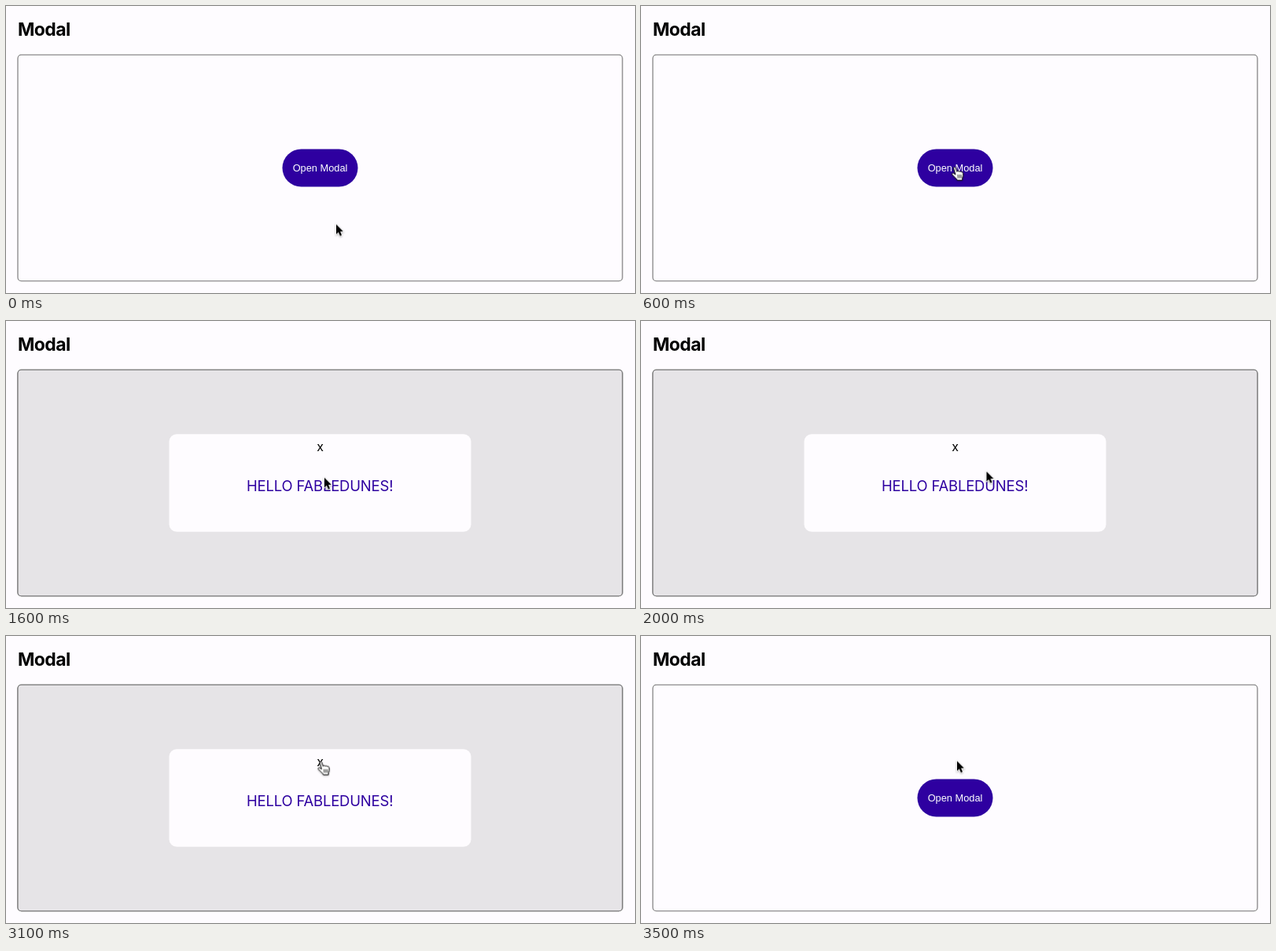
Recreate the animation shown at these times as an HTML page. Size 800 px wide and 366 px high, loop 5.5 s.

```html
<!DOCTYPE html>
<html lang="en">
<head>
<meta charset="utf-8">
<title>Modal</title>
<style>
  html, body { margin: 0; width: 100%; height: 100%; overflow: hidden; background: #fefcff; }
  svg { display: block; width: 800px; height: 366px; }
  text { font-family: Inter, "Open Sans", sans-serif; }

  .title { font-size: 23px; font-weight: 700; letter-spacing: -.6px; }
  .label { font: 12.8px "Liberation Sans", Arial, sans-serif; fill: #fff; text-anchor: middle; }
  .close { font-size: 16px; text-anchor: middle; }
  .hello { font-size: 18.5px; letter-spacing: -.2px; fill: #2e00a0; }
  .panel { fill: #fefcff; stroke: #707070; stroke-width: 1.1; }
  .dim { fill: #e6e4e7; }

  #modal, #cursor { animation: 5.5s step-end infinite; }
  #modal { animation-name: modal; }
  #cursor { animation-name: move, point; }
  #hand { opacity: var(--hand); }
  #arrow { opacity: calc(1 - var(--hand)); }
  #arrow, #hand { filter: drop-shadow(0 1px .8px rgba(0, 0, 0, .3)); }

  @keyframes modal {
    0%, 61.81% { visibility: hidden; }
    18.18% { visibility: visible; }
  }

  /* Moves advance once per 100 ms; other keys are held */
  @keyframes move {
    0% { transform: translate(420px, 278.5px); animation-timing-function: steps(6); }
    10.9% { transform: translate(398.2px, 205.8px); }
    18.18% { transform: translate(399.5px, 204.8px); }
    29.09% { transform: translate(405px, 199.8px); animation-timing-function: steps(2); }
    32.72% { transform: translate(397px, 160px); animation-timing-function: steps(2); }
    36.36% { transform: translate(439.5px, 192px); }
    40% { transform: translate(439.5px, 192px); animation-timing-function: steps(3); }
    45.45% { transform: translate(416px, 157.7px); animation-timing-function: steps(3); }
    50.9% { transform: translate(399.6px, 160.6px); }
    63.63%, 100% { transform: translate(402px, 159.5px); }
  }

  /* Hand over the button and the close mark, arrow elsewhere */
  @keyframes point {
    0%, 18.18%, 34.54%, 63.63%, 100% { --hand: 0; }
    7.26%, 32.72%, 50.9% { --hand: 1; }
  }
</style>
</head>
<body>
<svg viewBox="0 0 800 366">
  <text class="title" x="15" y="38">Modal</text>
  <rect class="panel" x="15" y="62.2" width="769" height="288.6" rx="4.5"/>
  <rect x="351.5" y="182.5" width="96" height="48" rx="24" fill="#2e00a0"/>
  <text class="label" x="399.5" y="210.5">Open Modal</text>

  <g id="modal">
    <rect class="panel dim" x="15" y="62.2" width="769" height="288.6" rx="4.5"/>
    <rect x="207.5" y="144.2" width="384" height="124.6" rx="9.6" fill="#fefcff"/>
    <text class="close" x="399.5" y="166">x</text>
    <text class="hello" x="306" y="217">HELLO FABLEDUNES!</text>
  </g>

  <g id="cursor">
    <path id="arrow" d="M0 0V12.6L2.9 10L4.9 14.7L7 13.8L5.1 9.1H8.9Z" stroke="#fff" stroke-width="1.4" paint-order="stroke"/>
    <g id="hand" stroke="#000" stroke-linecap="round" stroke-linejoin="round">
      <path fill="#fff" d="M-.6 .8C-.9 -.6 1.4 -.9 2 .6L3.6 5.4C4 4.4 6 4.3 6.3 5.4C6.9 4.6 8.6 4.8 8.9 5.9C9.8 5.3 11.1 5.9 11.3 7.2C11.7 9.9 11.6 11.4 10.6 13.4L10.4 16.3H4C3 14.1 .4 12 -2 9.7C-3.4 8.4 -2.2 6.8 -.6 7.5L1.5 9Z"/>
      <path fill="none" stroke-width=".8" d="M4.8 9.6L5 13.3M6.9 9.6L7 13.3M9 9.6V13.3"/>
    </g>
  </g>
</svg>
</body>
</html>
```
